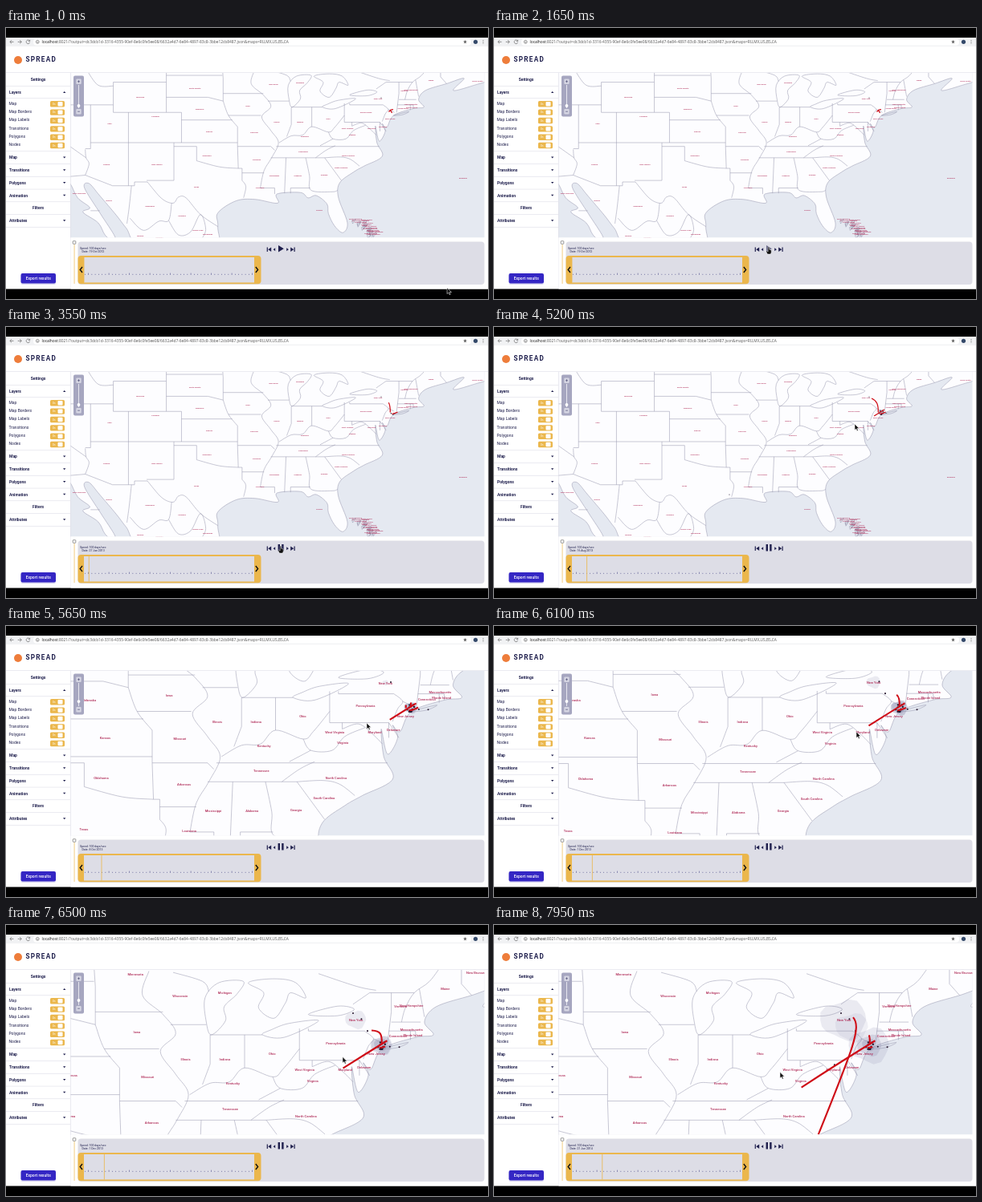
Recreate the animation shown at these times as an HTML page. Size 600x338 px, loop 8000 ms.

```html
<!DOCTYPE html>
<html lang="en">
<head>
<meta charset="utf-8">
<title>Spread map</title>
<style>
  html, body { margin: 0; width: 100%; height: 100%; overflow: hidden; background: #000; }
  svg { display: block; width: 100vw; height: 100vh; font-family: Roboto, Arial, sans-serif; }
  .line { fill: none; stroke: #9090a8; stroke-width: .5; stroke-linejoin: round; vector-effect: non-scaling-stroke; }
  .land { fill: #fdfdff; }
  .place { font-size: 2.45px; font-weight: 500; fill: #b02c58; text-anchor: middle; }
  .trail { fill: none; stroke: #cf0d17; stroke-width: 1.25; }
  .ui { fill: #1f1f4d; font-size: 5px; }
  .bold { font-weight: 600; }
  .small { font-size: 3.5px; }
  .mid { text-anchor: middle; }
</style>
</head>
<body>
<svg id="stage" viewBox="0 0 600 338" preserveAspectRatio="none">
  <defs><clipPath id="mapClip"><rect x="80" y="56" width="515.5" height="205.5"/></clipPath></defs>
  <rect width="600" height="338" fill="#000"/>
  <rect y="12" width="600" height="313.5" fill="#fff"/>
  <g id="browser"></g>
  <g clip-path="url(#mapClip)">
    <rect x="80" y="56" width="516" height="206" fill="#e5e9f1"/>
    <g id="view">
      <g id="geo" transform="matrix(-9.43 0 0 -9.43 1180.3 491.9)"></g>
      <g id="halos" fill="#77779f"></g>
      <g id="places"></g>
      <g id="nodes" fill="#24152b"></g>
      <g id="trails"></g>
    </g>
  </g>
  <g id="zoomBar"></g>
  <g id="sidebar"></g>
  <g id="timeline"></g>
  <path id="arrow" d="M0 0V7.6L1.8 6 3 8.7 4.3 8.1 3.1 5.5H5.5Z" fill="#111" stroke="#fff" stroke-width=".5"/>
  <path id="hand" d="M-.9 -3.5Q0 -4.4 .7 -3.5V-.8L3.2 0V3L2.2 5H-1.6L-3.2 1.6-2.4 .9-.9 2Z" fill="#111" stroke="#fff" stroke-width=".4"/>
</svg>
<script>
const LOOP = 8000, CLICK = 1750, START = 2700;
const $ = id => document.getElementById(id);

function add(parent, tag, attrs, text) {
  const el = document.createElementNS('http://www.w3.org/2000/svg', tag);
  for (const key in attrs) el.setAttribute(key, attrs[key]);
  if (text) el.textContent = text;
  return parent.appendChild(el);
}
const box = (parent, x, y, width, height, fill, rx = 0) =>
  add(parent, 'rect', { x, y, width, height, fill, rx });
const dot = (parent, cx, cy, r, attrs) => add(parent, 'circle', { cx, cy, r, ...attrs });
const path = (parent, d, attrs) => add(parent, 'path', { d, ...attrs });
const label = (parent, x, y, text, cls = 'ui', attrs = {}) =>
  add(parent, 'text', { x, y, class: cls, ...attrs }, text);

let seed = 7;
const random = () => (seed = seed * 16807 % 2147483647) / 2147483647;
const spread = (middle, reach) => middle + (random() * 2 - 1) * reach;

// Smooth curve through "x,y x,y ..." key points.
function curve(text, closed) {
  const pts = text.trim().split(/\s+/).map(p => p.split(',').map(Number)), n = pts.length;
  const at = i => closed ? pts[(i + n) % n] : pts[Math.max(0, Math.min(n - 1, i))];
  let d = `M${pts[0]}`;
  for (let i = 0; i < (closed ? n : n - 1); i++) {
    const [a, b, c, e] = [-1, 0, 1, 2].map(k => at(i + k));
    d += `C${b.map((v, k) => v + (c[k] - a[k]) / 6)} ${c.map((v, k) => v - (e[k] - b[k]) / 6)} ${c}`;
  }
  return d;
}

// Geography in degrees west, degrees north.
const geo = $('geo');
const coast = `118,33 116.7,31.6 115.7,29.7 114.1,28.4 115,27.8 113,26.4 112.1,24.8 111,23.9 110.8,24.6 112.7,27.6
  114.8,31 114.2,31.6 112.8,30 110.6,27.4 109.3,25.7 107,23 97.7,22
  97.2,25.9 97.2,27.7 94.8,29.3 92.3,29.5 89.3,29 89.4,30.2 86.3,30.4 85.3,29.7 84.2,30 82.8,28.9
  82.6,27.6 81.8,26 80.7,25.1 80.1,26.4 81.3,29.8 81.1,31.7
  79.3,33.1 77.9,33.9 75.5,35.2 76.2,37 76.4,39.2 75.9,37.2 75.1,38.5 75.5,39.5 74.9,39 74,40.6 71.4,41.5
  70,41.7 70.7,42.7 69.8,43.9 67,44.8 64.7,45.5 66.1,43.9 63,44.7 61,45.3`;
path(geo, curve(coast) + 'V50H120Z', { class: 'line land' });

const waters = [
  '87.4,41.7 86.3,42.8 86.4,43.9 85.4,44.9 84.9,45.9 86.8,45.8 87.9,44.6 87.8,42.7',
  '84.5,45.8 83.3,45 83.7,43.8 82.5,43 81.6,44.2 81.2,45 80,44.6 80.8,45.8 82.5,46.1',
  '83.4,41.7 81.7,41.5 79,42.8 81.3,42.6 82.7,42.1',
  '79.8,43.3 77.5,43.2 76.2,43.7 77.5,43.95',
  '74,40.6 72,41.1 72.8,40.7',
];
for (const shore of waters) path(geo, curve(shore, true), { class: 'line' });

const windingBorders = [
  '114.7,36.1 114.6,35 114.2,34.2 114.7,32.7',
  '106.5,31.8 104.6,29.6 103.1,29 102.4,29.8 101.4,29.7 99.5,27.5 97.2,25.9',
  '96.5,42.5 95.8,40.6 94.6,39.1',
  '100,34.6 97,33.8 94.5,33.6',
  '92.3,46.7 92.8,44.8 91.2,43.3 90.2,41.8 91.4,40.4 90.2,38.6 89.2,37 90.1,35 91.1,33.3 91.6,31',
  '89.1,37 87.5,37.9 86,38 84.8,39.1 82.6,38.4 81.8,39 80.5,40.6',
  '88.1,37.8 87.5,39.4', '94,32 93.5,31.2 93.8,29.7', '84.3,35 82.9,36 81.7,36.6', '83.1,35 82,33.5 80.9,32',
  '82.6,38.4 82,37.5 80.3,37.5 79.3,38.6 77.7,39.3', '82,37.5 83.7,36.6', '79.5,39.2 78.2,39.6 77.1,38.8 76.3,38',
  '75.5,39.8 75.1,40.8 74.7,41.4 75.4,42', '85.6,35 85.1,32.6 84.9,30.7 82.1,30.5 81.4,30.7',
  '83.1,35 81,35.1 79.7,34.8 78.5,33.9', '72.5,42.7 72.2,43.8 71.5,45 70.3,45.9 69.2,47.4', '71.1,45.3 70.7,43.1',
  '111,44.5 113,44.6 114.5,46.6', '76.3,44.1 75,45', '74.5,45.2 76,45.5 79,46.5', '90.4,46.6 88.1,45.9 87.6,45.1',
  '108.6,31.3 108.9,28.5 109.2,26.3', '108.8,27 107,25.4 105,26.6 103.7,26.7 103.3,29',
  '103.7,26.7 102.4,24.8 100.8,25.2 99.5,27.5 98.8,25.5 99.5,24',
];
for (const border of windingBorders) path(geo, curve(border), { class: 'line' });

const surveyedBorders = `M117,36.7 114.6,35M114,42V36.2H114.7M118,42H111V45H104V41H111V42M104,45V49M109,41V31.3M114,37H94.6
  M102,41V37M104,41H102M102,40H95.3M104,43H98.5L96.5,42.5V45.5L96.6,47M104,45.9H96.6M103,37V32H106.6
  M103,36.5H100V34.6M94.6,39.1V36.5L94.5,33.6H94V32M117,32.5 114.7,32.7 111.1,31.3H108.2V31.8H106.5M114,28H112.8
  M96.5,43.5H91.2M90.6,42.5H87.8M95.8,40.6H91.5M94.6,36.5H90.2L89.7,36M94,33H91.1M91.6,31H89.7V30.2M88.2,35 88.4,30.3
  M87.5,39.4V41.7H83.4M84.8,39.1V41.7M90.2,35H83.1M89.5,36.5H75.9M87.6,30.3V31H85M80.5,42.2V39.7H75.8L75,38.5
  M79.5,39.7V39.2M75.8,39.7V38.5M79.8,42.2V42H75.4M74.7,41.4 73.9,41M73.6,41 73.3,43.5V45M73.5,42H71.4V41.5M71.8,42V41.3
  M73.3,42.7H71M75,45H71.5M67.8,47V45.7L67,44.8`;
path(geo, surveyedBorders, { class: 'line' });

const places = `Wyoming 167 86|South Dakota 235 75|Nebraska 241 101|Colorado 186 110|Utah 129 119|Kansas 253 129|
Oklahoma 250 159|New Mexico 188 170|Arizona 125 170|Texas 237 198|Missouri 309 130|Arkansas 312 164|
Iowa 301 97|Illinois 337 117|Indiana 366 117|Ohio 401 113|Kentucky 372 135|Tennessee 370 154|
West Virginia 425 125|Virginia 431 133|North Carolina 426 159|South Carolina 417 174|Georgia 396 183|
Alabama 363 184|Mississippi 334 184|Louisiana 316 199|Florida 390 227|New York 463 88|
Pennsylvania 448 105|Michigan 366 68|Wisconsin 333 70|Minnesota 300 54|Maine 529 65|Vermont 496 78|
New Hampshire 504 77|Massachusetts 504 95|Connecticut 494 100|Rhode Island 505 99|New Jersey 478 113|
Delaware 469 123|Maryland 455 125|New Brunswick 553 53|Nova Scotia 587 66|Bermuda 569 187|Baja California 91 206|
Sonora 128 215|Chihuahua 179 222|Coahuila 219 234|Nuevo León 239 252|Tamaulipas 251 257|Sinaloa 167 259|Durango 191 261`;
for (const entry of places.split('|')) {
  const [, name, x, y] = entry.trim().match(/^(.+) (\d+) (\d+)$/);
  label($('places'), x, +y + .7, name, 'place');
}
const islands = 'Grand Bahama|North Abaco|East Grand Bahama|Central Abaco|South Abaco|Hope Town|Bimini|North Andros|Berry Islands|New Providence|Spanish Wells|Harbour Island|North Eleuthera|Central Andros|South Eleuthera';
islands.split('|').forEach((name, i) => {
  const y = 238.5 + i * 1.4, x = spread(442 + i * 1.2, 7);
  label($('places'), x, y, name, 'place');
  path(geo, `M${(1180 - x) / 9.43},${(492 - y) / 9.43}l.5,-.2 -.1,-.4Z`, { class: 'line' });
});

// Value at time t, linear between [time, value] key points.
function track(t, keys) {
  const next = keys.findIndex(([time]) => t < time);
  if (next <= 0) return keys[next ? keys.length - 1 : 0][1];
  const [t0, v0] = keys[next - 1], [t1, v1] = keys[next];
  return v0 + (v1 - v0) * (t - t0) / (t1 - t0);
}
const linear = (t, from, to) => Math.max(0, Math.min(1, (t - from) / (to - from)));
const ramp = (t, from, to) => { const p = linear(t, from, to); return p * p * (3 - 2 * p); };

// Each trail grows over its key times; some shrink back afterwards.
const trails = [
  ['M478.3 106.5C478.5 96 476.5 92 470 89', [[START, 0], [3550, .6], [4900, 1], [5250, 1], [5700, 0]]],
  ['M482 106C482.5 98 481 95.6 474.5 95.4', [[5400, 0], [6500, 1], [6800, 1], [7600, .45]]],
  ['M486 103Q460 119 431.5 137.6', [[4340, 0], [7950, 1]]],
  ['M469.7 85.7C476 93 470 108 444 172.6', [[6600, 0], [7950, 1]]],
  ['M480.5 108.3Q484 108 487.5 106', [[START, 0], [3300, 1], [6000, 1], [6600, .5]]],
].map(([d, keys]) => ({ keys, el: path($('trails'), d, { class: 'trail', pathLength: 1 }) }));
const idleTrail = path($('trails'), 'M476.5 104.5L479 102 482 101.6M478.5 102.5L480.5 106', { class: 'trail' });

const nodes = [];
const addNode = (x, y, r, from) => nodes.push({ from, el: dot($('nodes'), x, y, r) });
for (let i = 0; i < 12; i++) addNode(spread(482, 3), spread(106.5, 3.2), .7, 3000 + i * 220);
[[467, 87], [293, 209], [488, 107.5], [495, 107.7], [471.5, 95.8], [460.8, 82.7], [456, 120.8]]
  .forEach(([x, y], i) => addNode(x, y, .6, i && 4300 + i * 430));

const halos = [
  { x: 482, y: 106.5, r: 15, from: 4800, to: 7950, opacity: .15 },
  { x: 482, y: 106.5, r: 9, from: 4000, to: 7000, opacity: .2 },
  { x: 481.5, y: 106, r: 5, from: 3600, to: 6000, opacity: .25 },
  { x: 463, y: 87.5, r: 17, from: 5300, to: 7950, opacity: .14 },
  { x: 469, y: 93, r: 12, from: 6500, to: 7950, opacity: .1 },
];
for (const halo of halos) {
  let rim = '';
  for (let a = 0; a < 6.2; a += Math.PI / 9) {
    const r = halo.r * (1 + .1 * Math.sin(a * 3 + halo.x) + .06 * Math.cos(a * 5));
    rim += `${r * Math.cos(a)},${r * .85 * Math.sin(a)} `;
  }
  halo.el = add($('halos'), 'polygon', { points: rim, opacity: halo.opacity });
}

// Browser bar and page header.
const browser = $('browser'), grey = { fill: 'none', stroke: '#666', 'stroke-width': .7 };
box(browser, 0, 12, 600, 11, '#f1f2f4');
box(browser, 34, 13.2, 545, 8.6, '#fff', 4);
path(browser, 'M9.5 17.3H5M7 15.2 4.9 17.3 7 19.4M14.7 17.3H19.2M17.2 15.2 19.3 17.3 17.2 19.4M29.5 16.2A2.3 2.3 0 1 0 29.6 18.2M29.7 14.8V16.6H27.9M43 17.3', grey);
dot(browser, 39.3, 17.3, 1.9, grey);
path(browser, 'M39.3 16.8V18.5', grey);
const url = label(browser, 44.5, 19, '', 'ui', { style: 'font:4.83px "Open Sans",sans-serif;fill:#555' });
add(url, 'tspan', { fill: '#111' }, 'localhost');
add(url, 'tspan', {}, ':8021/?output=dc3dcb1d-3316-4355-90ef-8e6c0fe5ee08/6632a4d7-6e84-4897-83c8-3bbe12cb8487.json&maps=RU,MX,US,BS,CA');
path(browser, 'M571.5 14.7L573 19.4 569.1 16.5H573.9L570 19.4Z', { fill: '#555' });
dot(browser, 584.5, 17.3, 2.6, { fill: '#34496a' });
for (const dy of [-1.8, 0, 1.8]) dot(browser, 594, 17.3 + dy, .5, { fill: '#555' });
dot(browser, 15, 40, 5, { fill: '#ee7d3b' });
label(browser, 24.5, 41.9, 'SPREAD', 'ui bold', { style: 'font-size:8.2px;letter-spacing:1.25px' });

// Zoom slider.
const zoomBar = $('zoomBar');
box(zoomBar, 84, 59.5, 13, 51, '#a6a6c0', 2);
path(zoomBar, 'M90.5 71V100', { stroke: '#e6e6ef' });
for (const y of [63.5, 101]) box(zoomBar, 87.3, y, 6.4, 6.4, '#d5d5e2', 1);
path(zoomBar, 'M89 66.7H92M90.5 65.2V68.2M89 104.2H92', { stroke: '#55557c', 'stroke-width': .7 });
const knob = dot(zoomBar, 90.5, 97, 1.9, { fill: '#fff' });

// Sidebar: rows share one pitch; the layer switches sit inside the first section.
const sidebar = $('sidebar'), gold = '#ebb74c', ROW = 15.75;
const rule = (y, width = 80) => box(sidebar, 0, y, width, .6, '#dedee8');
const heading = (text, y) => label(sidebar, 40, y + 1.8, text, 'ui bold mid');
function section(text, y, open) {
  const s = open ? -.9 : .9;
  label(sidebar, 4, y + 1.8, text, 'ui bold');
  path(sidebar, `M71 ${y - s}H74.4L72.7 ${y + s}Z`, { fill: '#1f1f4d' });
}
box(sidebar, 80, 56, .6, 269, '#dedee8');
rule(55.2, 600);
rule(72.2);
rule(87.2);
heading('Settings', 64.2);
section('Layers', 80, true);
['Map', 'Transitions', 'Polygons', 'Animation', 'Filters', 'Attributes'].forEach((text, i) => {
  const y = 161.5 + i * ROW;
  rule(y - 8);
  (text === 'Filters' ? heading : section)(text, y);
});
rule(248.2);
['Map', 'Map Borders', 'Map Labels', 'Transitions', 'Polygons', 'Nodes'].forEach((text, i) => {
  const y = 94.8 + i * 10.35;
  label(sidebar, 3.5, y + .7, text);
  box(sidebar, 55, y - 3.7, 18, 7.4, gold, 1.5);
  box(sidebar, 64.5, y - 2.7, 6, 5.4, '#fff', 1);
  label(sidebar, 59.5, y + 1, 'On', 'mid', { style: 'font-size:3px;fill:#fff' });
});
box(sidebar, 18.5, 307.5, 43.5, 12.5, '#d9d7f0', 2);
box(sidebar, 18.5, 306, 43.5, 12.5, '#3426c4', 2);
label(sidebar, 40.2, 314, 'Export results', 'mid', { style: 'font-size:5px;font-weight:500;fill:#fff' });

// Timeline panel.
const panel = $('timeline'), navy = { fill: '#1f1f4d' };
box(panel, 80.5, 261.5, 519.5, 64, '#fff');
box(panel, 89.5, 266.5, 506, 53.5, '#dddde6', 4);
box(panel, 84.7, 270, .7, 49, gold);
add(panel, 'rect', { x: 83.2, y: 265.7, width: 3.6, height: 3.6, rx: .6, fill: '#fff', stroke: '#555', 'stroke-width': .6 });
label(panel, 92, 275.5, 'Speed: 100 days/sec', 'ui small');
const dateText = label(panel, 94.5, 280, '', 'ui small');
box(panel, 89.5, 284, 228, 35.3, gold, 4);
box(panel, 97, 286, 212, 31.5, '#dddde6');
path(panel, 'M95 298L92.2 301.5 95 305M310.8 298L313.6 301.5 310.8 305', { fill: 'none', stroke: '#111', 'stroke-width': 1.4 });
for (let i = 0; i < 50; i++) {
  const height = i % 6 === 1 ? 2.4 : 1.2;
  box(panel, 98 + i * 4.25, 308 - height, .7, height, '#66669a');
}
const marker = box(panel, 97, 286, .8, 31.5, gold);
for (const side of [-1, 1])
  path(panel, 'M7 -2V2L9.6 0ZM12 -2.8V2.8L16 0ZM16.3 -2.8H17.5V2.8H16.3Z',
    { ...navy, transform: `translate(342.2 276.2) scale(${side} 1)` });
const play = path(panel, 'M339 271V279.4L345.8 275.2Z', navy);
const pause = path(panel, 'M338.6 271H341V279.4H338.6ZM343.2 271H345.6V279.4H343.2Z', navy);

const dayKeys = [[START, 0], [3550, 100], [5200, 301], [6100, 408], [6500, 408], [7950, 610]];
const moves = [
  { from: 1150, to: 1550, x: 342, y: 277 },
  { from: 4000, to: 4700, x: 449, y: 121 },
  { from: 5800, to: 6050, x: 451, y: 132 },
  { from: 6150, to: 6450, x: 419, y: 164.5 },
  { from: 6700, to: 7400, x: 356, y: 183.5 },
];
const dateFormat = new Intl.DateTimeFormat('en-US', { timeZone: 'UTC', day: 'numeric', month: 'short', year: 'numeric' });
function dateAfter(days) {
  const parts = dateFormat.formatToParts(Date.UTC(2012, 9, 19 + Math.floor(days + .001)));
  return ['day', 'month', 'year'].map(type => parts.find(p => p.type === type).value).join(' ');
}
const show = (el, on) => el.setAttribute('visibility', on ? 'visible' : 'hidden');

function drawCursor(t) {
  let x = 549, y = 324;
  for (const move of moves) {
    const p = ramp(t, move.from, move.to);
    x += (move.x - x) * p;
    y += (move.y - y) * p;
  }
  const hovering = t >= 1500 && t < 4050;
  for (const el of [$('arrow'), $('hand')]) {
    el.setAttribute('transform', `translate(${x} ${y})`);
    show(el, (el.id === 'hand') === hovering);
  }
}

function draw(t) {
  const zoom = ramp(t, 5250, 5700), pan = ramp(t, 6150, 6450);
  $('view').setAttribute('transform',
    `translate(${-307 * zoom - 37 * pan} ${-77.2 * zoom + 48 * pan}) scale(${1 + .684 * zoom})`);
  knob.setAttribute('cy', 97 - 3 * zoom);

  for (const { el, keys } of trails) {
    const shown = track(t, keys);
    show(el, shown > 0);
    el.setAttribute('stroke-dasharray', `${shown} 2`);
  }
  show(idleTrail, t < START);
  for (const { el, from } of nodes) show(el, t >= from);
  for (const { el, x, y, from, to } of halos)
    el.setAttribute('transform', `translate(${x} ${y}) scale(${linear(t, from, to)})`);

  const days = track(t, dayKeys);
  dateText.textContent = `Date: ${dateAfter(days)}`;
  marker.setAttribute('x', 96.6 + .062 * days);
  show(play, t < CLICK);
  show(pause, t >= CLICK);
  play.setAttribute('opacity', t > 1500 ? .6 : 1);
  drawCursor(t);
}

const begin = performance.now();
function tick() {
  draw((performance.now() - begin) % LOOP);
  requestAnimationFrame(tick);
}
draw(0);
requestAnimationFrame(tick);
</script>
</body>
</html>
```
